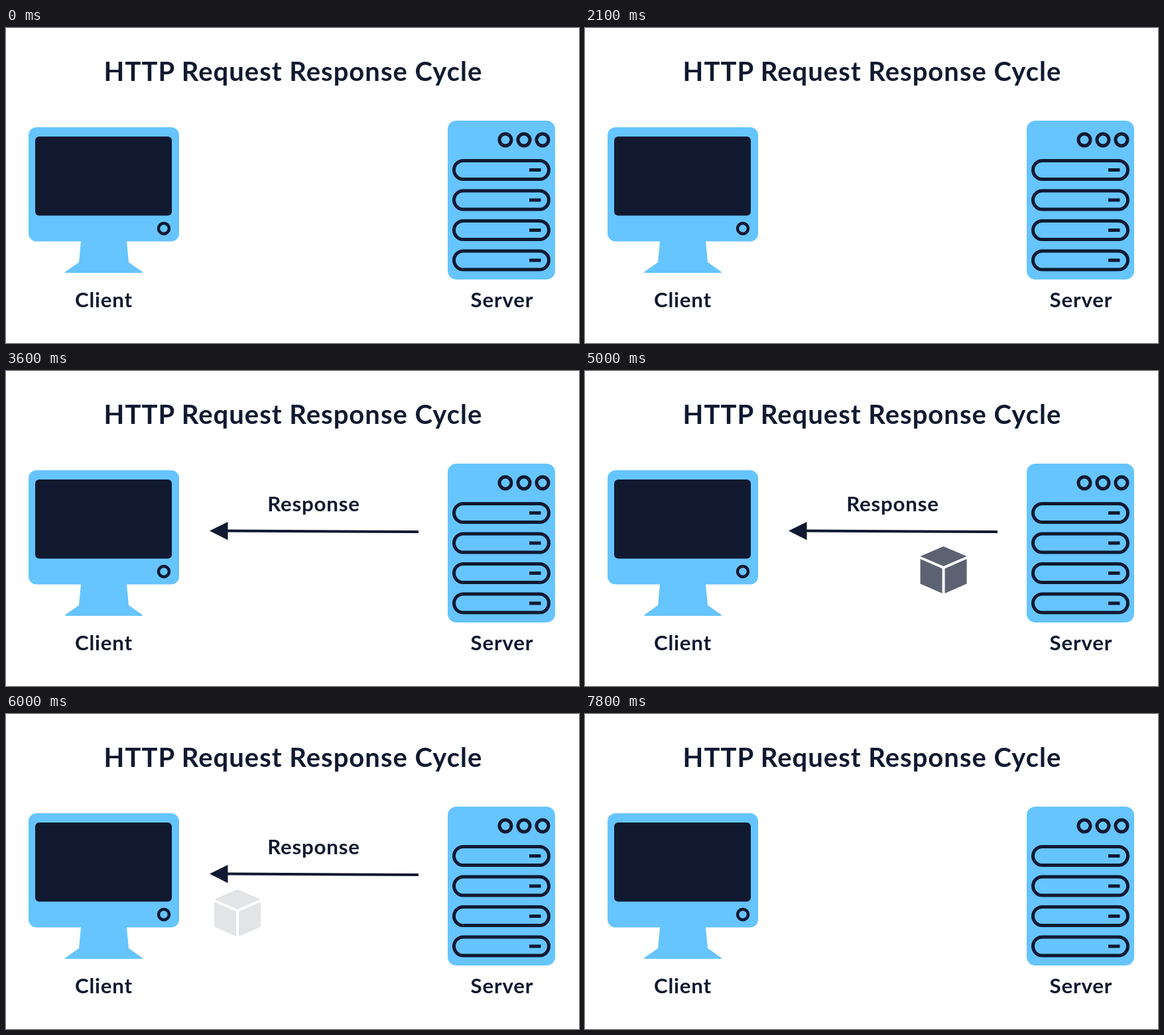
Animation, 864 px wide and 476 px high, one loop 8000 ms. Source, as an HTML page:

```html
<!DOCTYPE html>
<html lang="en">
<head>
<meta charset="utf-8">
<title>HTTP Request Response Cycle</title>
<style>
  html, body { margin: 0; height: 100%; overflow: hidden; background: #fff; }
  svg { display: block; width: 100%; height: 100%; }
  text {
    font: bold 31.3px Lato, "Open Sans", sans-serif;
    letter-spacing: .025em;
    text-anchor: middle;
  }
  .title { font-size: 40px; }
  .blue { fill: #66c4ff; }
  .outline { fill: none; stroke: #101930; stroke-width: 5; }
  .shaft { stroke: #101930; stroke-width: 4; }
</style>
</head>
<body>
<svg viewBox="0 0 864 476" fill="#101930">
  <text class="title" x="433" y="80">HTTP Request Response Cycle</text>

  <g id="client">
    <rect class="blue" x="34" y="150" width="227" height="172.5" rx="12"/>
    <rect x="44" y="164" width="206" height="119.5" rx="6"/>
    <circle class="outline" cx="238" cy="303" r="8" style="stroke-width:4.5"/>
    <path class="blue" d="M113 322H182L185 354L205 368Q207 370 204 370H90Q88 370 90 368L110 354Z"/>
    <text x="147.4" y="422">Client</text>
  </g>

  <g id="server">
    <rect class="blue" x="666" y="140" width="162" height="240" rx="13"/>
    <g class="outline">
      <circle cx="753" cy="169" r="9"/>
      <circle cx="781" cy="169" r="9"/>
      <circle cx="809" cy="169" r="9"/>
    </g>
    <defs>
      <g id="drive" class="outline">
        <rect x="675.5" y="-14" width="143" height="28" rx="14"/>
        <path d="M789 0H806.5"/>
      </g>
    </defs>
    <use href="#drive" y="214.5"/>
    <use href="#drive" y="260"/>
    <use href="#drive" y="305.5"/>
    <use href="#drive" y="351"/>
    <text x="747.9" y="422">Server</text>
  </g>

  <g id="request" opacity="0">
    <text x="466" y="209">Request</text>
    <path class="shaft" d="M308 239L598 240"/>
    <path d="M596 226L623 240L596 254Z"/>
  </g>

  <g id="response" opacity="0">
    <text x="464" y="212">Response</text>
    <path class="shaft" d="M622 243L332 241.5"/>
    <path d="M334.5 228L307 241.5L334.5 255.5Z"/>
  </g>

  <g id="cube" opacity="0">
    <path d="M0 265L35 280L0 295L-35 280Z
             M-35 284L-2 298.5V336L-35 321.5Z
             M35 284L2 298.5V336L35 321.5Z"/>
  </g>
</svg>
<script>
  const LOOP = 8000, STEP = 100;
  const FADE = 600;
  const CUBE = { start: 4500, end: 6300, x: 464, reach: 146.5, ramp: .15, fadePower: 1.2 };
  const [request, response, cube] =
    ["request", "response", "cube"].map(id => document.getElementById(id));

  const clamp = v => Math.min(1, Math.max(0, v));

  const fadeInOut = (t, inAt, outAt) =>
    clamp((t - inAt) / FADE) - clamp((t - outAt) / FADE);

  // Constant speed with a short linear speed-up and slow-down.
  function ease(p, ramp) {
    const scale = 1 - ramp;
    if (p < ramp) return p * p / (2 * ramp * scale);
    if (p > 1 - ramp) return 1 - ease(1 - p, ramp);
    return (p - ramp / 2) / scale;
  }

  function draw(now) {
    const t = Math.floor((now % LOOP) / STEP) * STEP;
    request.setAttribute("opacity", fadeInOut(t, 0, 1500));
    response.setAttribute("opacity", fadeInOut(t, 3000, 7200));

    const p = clamp((t - CUBE.start) / (CUBE.end - CUBE.start));
    const x = CUBE.x + CUBE.reach * (1 - 2 * ease(p, CUBE.ramp));
    cube.setAttribute("transform", `translate(${x.toFixed(2)} 0)`);
    cube.setAttribute("opacity", p > 0 ? (1 - p) ** CUBE.fadePower : 0);
  }

  const began = performance.now();
  function tick() {
    draw(performance.now() - began);
    requestAnimationFrame(tick);
  }
  tick();
</script>
</body>
</html>
```
